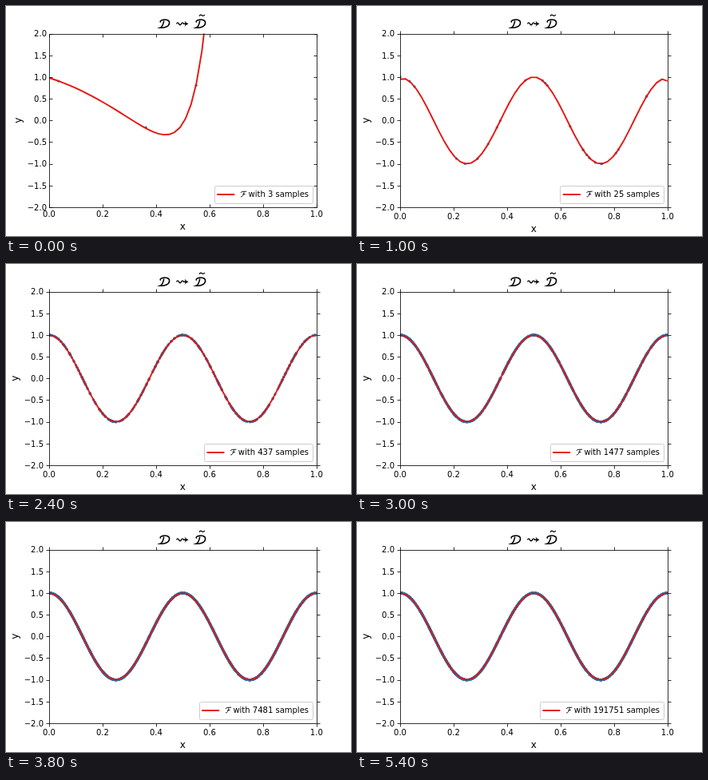
These frames come from a looping animation (432 by 288 pixels, 5.6 s). An HTML page with a canvas:

```html
<!DOCTYPE html>
<html lang="en">
<head>
<meta charset="utf-8">
<title>Curve fit with growing samples</title>
<style>
html, body { margin: 0; width: 100%; height: 100%; overflow: hidden; background: #fff; }
canvas { display: block; }
</style>
</head>
<body>
<canvas id="plot" width="432" height="288"></canvas>
<script>
const ctx = document.getElementById('plot').getContext('2d');
const STEP = 200, STEPS = 28;
const RED = '#e5140f', BLUE = '#1f77b4';
const L = 54, R = 388.8, T = 34.56, B = 252;
const px = x => L + x * (R - L);
const py = y => (T + B) / 2 - y * (B - T) / 4;
const snap = v => Math.floor(v + 0.5) + 0.5;
const wave = x => Math.cos(4 * Math.PI * x);

const scriptD = new Path2D('M4.5 1.2C1.5 1 .4 3 1.8 4M3 1.2C8 -.4 13 1 12.6 4.8C12.2 9 7 11.2 1 10.8C3.6 10 5 6 5.8 2');
const scriptF = new Path2D('M.7 2.3C1.5 .4 4 .7 8 .6M5 .7C4.4 4 3.4 7.6 .7 7.3M3.2 4H6.4');
const squiggle = new Path2D('M213.5 22.3q1.5 -2.8 3 0t3 0t3 0H227');
const arrowHead = new Path2D('M223.5 18.5Q225.5 21.2 228.5 22.2Q225.5 23.2 223.5 26L224.8 22.2Z');
const tilde = new Path2D('M242 12.6q1.6 -2.4 3.4 -.9t3.4 -.9');

// Seeded sample positions; the first three are fixed.
let seed = 7;
const random = () => (seed = seed * 16807 % 2147483647) / 2147483647;
const samples = [0.035, 0.362, 0.55];
while (samples.length < 3000) samples.push(random());

// The first fit diverges; later ones miss only near the edges.
function fit(x, step) {
  if (!step) return 0.98 - 1.96 * x - 4.29 * x * x + 3.6 * Math.exp(16 * (x - 0.58));
  const miss = 2.5 ** (5 - step), rate = 16 * step;
  return wave(x) - miss * (0.05 * Math.exp(-x * rate) + 0.09 * Math.exp((x - 1) * rate));
}

function line(x1, y1, x2, y2) {
  ctx.beginPath();
  ctx.moveTo(x1, y1);
  ctx.lineTo(x2, y2);
  ctx.stroke();
}

function text(str, x, y, size, align) {
  ctx.font = size + 'px "DejaVu Sans", sans-serif';
  ctx.textAlign = align;
  ctx.fillText(str, x, y);
}

function glyph(path, x, y, width) {
  ctx.save();
  ctx.translate(x, y);
  ctx.lineWidth = width;
  ctx.stroke(path);
  ctx.restore();
}

function drawAxes(inward) {
  const dir = inward ? -4 : 4;
  const shiftX = inward ? 4 : 0, shiftY = inward ? 3 : 0;
  const [l, r, t, b] = [L, R, T, B].map(snap);
  ctx.strokeStyle = ctx.fillStyle = '#000';
  ctx.lineWidth = 0.8;
  ctx.strokeRect(l, t, r - l, b - t);
  for (let i = 0; i <= 5; i++) {
    const x = snap(px(i / 5));
    line(x, b, x, b + dir);
    line(x, t, x, t - dir);
    text((i / 5).toFixed(1), px(i / 5), 267 - shiftY, 10, 'center');
  }
  for (let i = -4; i <= 4; i++) {
    const y = snap(py(i / 2));
    line(l, y, l - dir, y);
    line(r, y, r + dir, y);
    text((i / 2).toFixed(1).replace('-', '\u2212'), 47 + shiftX, Math.round(py(i / 2) + 3.8), 10, 'right');
  }
  text('x', 221.4, 283 - shiftY, 12, 'center');
  ctx.save();
  ctx.translate(15 + shiftX, 143.3);
  ctx.rotate(-Math.PI / 2);
  text('y', 0, 0, 12, 'center');
  ctx.restore();
}

function drawTitle() {
  ctx.strokeStyle = ctx.fillStyle = '#000';
  glyph(scriptD, 192, 16.5, 1.5);
  glyph(scriptD, 237, 16.5, 1.5);
  glyph(squiggle, 0, 0, 1.4);
  glyph(tilde, 0, 0, 1.2);
  ctx.fill(arrowHead);
}

function drawData(step, count) {
  ctx.save();
  ctx.beginPath();
  ctx.rect(L, T, R - L, B - T);
  ctx.clip();
  ctx.fillStyle = BLUE;
  for (const x of samples.slice(0, count)) {
    ctx.beginPath();
    ctx.arc(px(x), py(wave(x)), 1.6, 0, 7);
    ctx.fill();
  }
  ctx.beginPath();
  for (let i = 0; i < 50; i++) ctx.lineTo(px(i / 49), py(fit(i / 49, step)));
  ctx.strokeStyle = RED;
  ctx.lineWidth = 1.9;
  ctx.lineJoin = 'round';
  ctx.stroke();
  ctx.restore();
}

function drawLegend(count) {
  const left = 261.2 - 6.36 * (String(count).length - 1);
  const edge = Math.floor(left) + 0.5;
  ctx.beginPath();
  ctx.roundRect(edge, 225.5, 384.5 - edge, 22, 2);
  ctx.fillStyle = 'rgba(255,255,255,.8)';
  ctx.fill();
  ctx.strokeStyle = '#ccc';
  ctx.lineWidth = 1;
  ctx.stroke();
  ctx.strokeStyle = RED;
  ctx.lineWidth = 1.9;
  line(left + 3, 236, left + 25, 236);
  ctx.strokeStyle = ctx.fillStyle = '#000';
  glyph(scriptF, left + 32, 231.6, 0.9);
  text(`with ${count} samples`, 379, 239, 10, 'right');
}

function draw(step) {
  const count = Math.floor(1.5 ** (step + 3));
  ctx.fillStyle = '#fff';
  ctx.fillRect(0, 0, 432, 288);
  drawData(step, count);
  drawAxes(step === 0);
  drawTitle();
  drawLegend(count);
}

const start = performance.now();
let shown = -1;
function tick() {
  const step = Math.floor((performance.now() - start) / STEP) % STEPS;
  if (step !== shown) draw(shown = step);
  requestAnimationFrame(tick);
}
tick();
</script>
</body>
</html>
```
